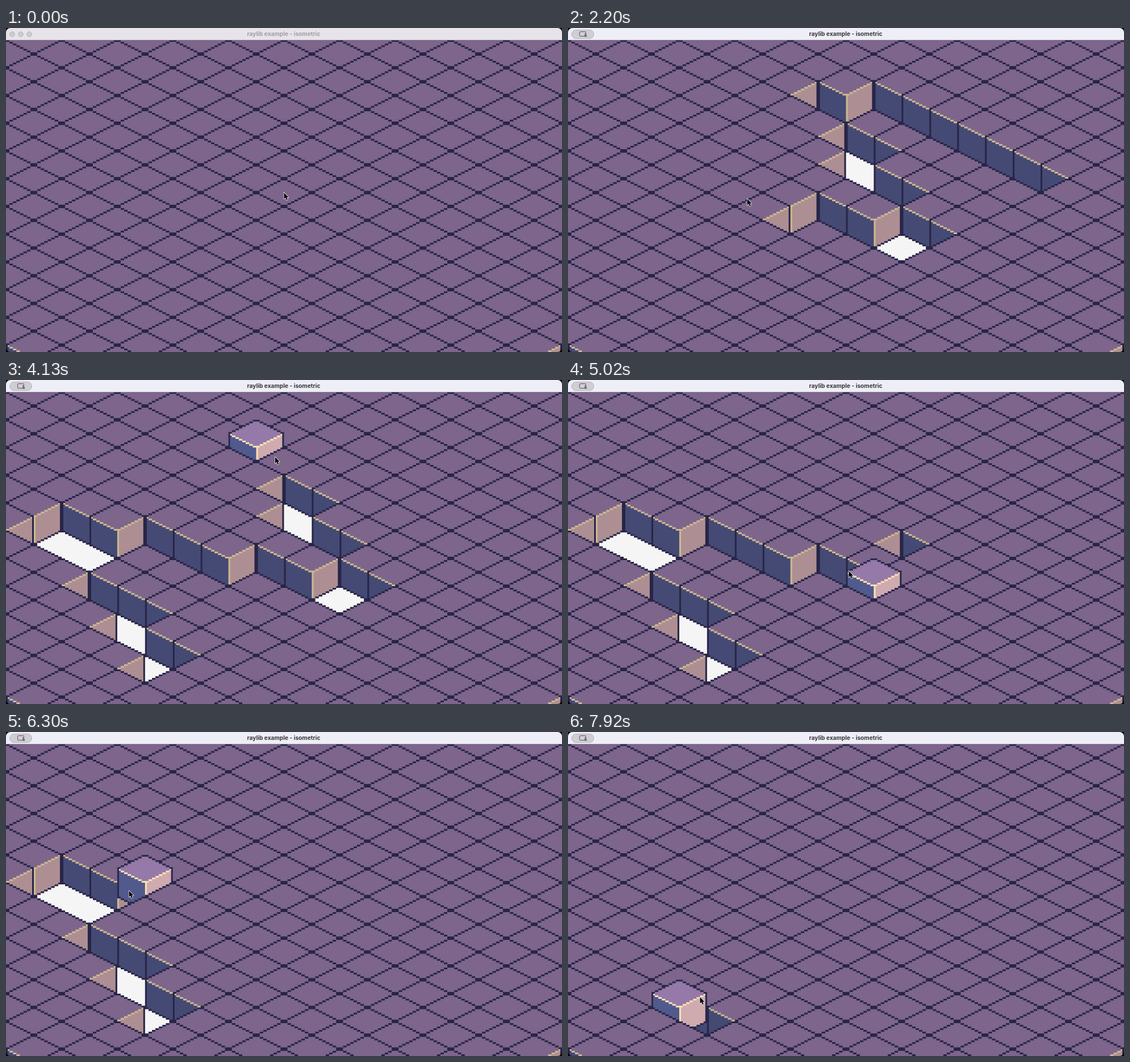
Write an HTML page with a canvas that moves like this. It is 979x572 px and loops after 8 s.

```html
<!DOCTYPE html>
<html lang="en">
<head>
<meta charset="utf-8">
<title>raylib example - isometric</title>
<style>
  html, body { margin: 0; width: 100%; height: 100%; overflow: hidden; background: #000; }
  canvas { display: block; }
</style>
</head>
<body>
<canvas id="stage" width="979" height="572"></canvas>
<script>
const LOOP = 8000, WIDTH = 979, HEIGHT = 572, BAR = 21.4;
const GAME_W = 320, GAME_H = 180, ZOOM = 4, LIFT = 8;
const SCALE = WIDTH / GAME_W;
const BUTTON_TIME = 420, FOCUS_TIME = 1060, POINTER_LEAD = 40;

// A tile is named by its top corner [i, j]: 16 pixels per i, 8 per j, i + j even.
// Each stroke runs at an even pace along the tiles between its corners.
const strokes = [
  { from: 180, to: 940, mode: 'look', corners: [[10,10], [16,10], [17,11]] },
  { from: 1060, to: 1715, mode: 'dig', corners: [[17,9], [11,3], [9,3], [10,4]] },
  { from: 1790, to: 2760, mode: 'dig', corners: [
    [10,6], [11,7], [10,8], [12,10], [12,12], [13,13], [12,14], [9,11], [8,12], [5,9],
    [4,10], [2,8], [1,9], [3,11], [3,13], [5,15], [4,16], [6,18], [5,19]] },
  { from: 2930, to: 3370, mode: 'look', corners: [[7,17], [10,14], [14,14], [18,10]] },
  { from: 3402, to: 4338, mode: 'fill', corners: [[17,9], [11,3], [10,4], [8,2], [10,4], [10,6], [11,7]] },
  { from: 4684, to: 5264, mode: 'fill', corners: [
    [10,8], [11,9], [13,9], [14,10], [14,12], [12,14], [12,12], [11,13], [10,12], [12,10], [10,10], [8,12]] },
  { from: 5495, to: 6295, mode: 'fill', corners: [[9,11], [8,12], [5,9]] },
  { from: 6375, to: 7105, mode: 'fill', corners: [[4,10], [2,8], [1,9], [3,11], [3,13], [4,14]] },
  { from: 7185, to: 7990, mode: 'fill', corners: [[3,13], [5,15], [4,16], [6,18], [4,18], [5,17]] }
];

// Moves diagonally to each corner, or by two along one axis when the other already fits.
function walk([start, ...corners]) {
  const tiles = [start];
  let [i, j] = start;
  for (const [toI, toJ] of corners) {
    while (i !== toI || j !== toJ) {
      const di = Math.sign(toI - i), dj = Math.sign(toJ - j);
      i += dj ? di : 2 * di;
      j += di ? dj : 2 * dj;
      tiles.push([i, j]);
    }
  }
  return tiles;
}

const visits = strokes.flatMap(({ from, to, mode, corners }) => walk(corners).map((tile, n, tiles) =>
  ({ time: from + (to - from) * n / (tiles.length - 1), mode, tile })));

const ctx = document.getElementById('stage').getContext('2d');
const game = makeCanvas(GAME_W * ZOOM, GAME_H * ZOOM);
const plainBlock = makeBlock({ line: '#282548', top: '#7d658c', left: '#444a74', right: '#ad8f93', edge: '#ccb88f' });
const litBlock = makeBlock({ line: '#2a294c', top: '#9579a8', left: '#515a8c', right: '#cfabb0', edge: '#fce0b2' });

function makeCanvas(width, height) {
  const canvas = document.createElement('canvas');
  canvas.width = width;
  canvas.height = height;
  return canvas;
}

function makeBlock(color) {
  const canvas = makeCanvas(32, 32), pen = canvas.getContext('2d');
  for (let x = 0; x < 32; x++) {
    const step = Math.min(x, 31 - x) >> 1;
    const top = 7 - step, rim = 8 + step, bottom = 24 + step;
    const column = (from, to, fill) => {
      pen.fillStyle = fill;
      pen.fillRect(x, from, 1, to - from);
    };
    column(top, bottom + 1, color.line);
    if (x === 0 || x === 31) continue;
    column(top + 1, rim, color.top);
    column(rim, rim + 1, color.edge);
    column(rim + 1, bottom, x < 16 ? color.left : x === 16 ? color.edge : color.right);
  }
  return canvas;
}

function worldAt(time) {
  const missing = new Set(['0,22', '20,22']);
  let hover = '';
  for (const visit of visits) {
    if (visit.time > time) break;
    hover = visit.tile.join();
    if (visit.mode === 'dig') missing.add(hover);
    if (visit.mode === 'fill') missing.delete(hover);
  }
  return { missing, hover };
}

function drawGame(time) {
  const pen = game.getContext('2d');
  const { missing, hover } = worldAt(time);
  pen.setTransform(ZOOM, 0, 0, ZOOM, 0, 0);
  pen.imageSmoothingEnabled = false;
  pen.fillStyle = '#f5f5f5';
  pen.fillRect(0, 0, GAME_W, GAME_H);
  for (let j = -2; j <= 22; j++) {
    for (let i = j & 1; i <= 20; i += 2) {
      const key = i + ',' + j;
      if (missing.has(key)) continue;
      const lit = key === hover;
      pen.drawImage(lit ? litBlock : plainBlock, 16 * i - 16, 8 * j - (lit ? LIFT : 0));
    }
  }
  ctx.imageSmoothingQuality = 'high';
  ctx.drawImage(game, 0, BAR, WIDTH, HEIGHT - BAR);
}

function shape(fill, stroke, build) {
  ctx.beginPath();
  build();
  if (fill) { ctx.fillStyle = fill; ctx.fill(); }
  if (stroke) { ctx.strokeStyle = stroke; ctx.stroke(); }
}

function drawShareButton() {
  shape('#d0ced4', '#b4b2b9', () => ctx.roundRect(6.5, 3.5, 39, 15, 7.5));
  shape(null, '#59575e', () => ctx.roundRect(20.5, 6.5, 11, 8, 1.5));
  shape('#d0ced4', null, () => ctx.rect(28, 9, 6, 7));
  shape('#59575e', null, () => ctx.arc(30.8, 10.8, 1.5, 0, 7));
  shape('#59575e', null, () => ctx.roundRect(28.3, 12.8, 5, 2.4, 1));
}

function drawTitleBar(time) {
  const focused = time >= FOCUS_TIME;
  ctx.lineWidth = 1;
  ctx.fillStyle = focused ? '#eeeef7' : '#e6e4e9';
  ctx.fillRect(0, 0, WIDTH, 21);
  ctx.fillStyle = '#8d8496';
  ctx.fillRect(0, 21, WIDTH, 0.8);
  if (time < BUTTON_TIME) {
    for (const x of [11, 26, 41]) shape('#cecccf', '#b3b1b5', () => ctx.arc(x, 11, 4.3, 0, 7));
  } else {
    drawShareButton();
  }
  ctx.font = 'bold 10.2px Inter, sans-serif';
  ctx.textAlign = 'center';
  ctx.fillStyle = focused ? '#39373c' : '#a09ea3';
  ctx.fillText('raylib example - isometric', 489, 14);
}

function tileCentre([i, j]) {
  return [16 * i * SCALE, BAR + 8 * (j + 1) * SCALE];
}

// The pointer glides from tile to tile, a little ahead of the game.
function pointerAt(time) {
  const last = visits.findLast(visit => visit.time <= time) || visits[0];
  const next = visits.find(visit => visit.time > time) || last;
  const part = next.time > last.time ? (time - last.time) / (next.time - last.time) : 0;
  const [x0, y0] = tileCentre(last.tile), [x1, y1] = tileCentre(next.tile);
  return [x0 + (x1 - x0) * part, y0 + (y1 - y0) * part];
}

function drawPointer(time) {
  ctx.save();
  ctx.translate(...pointerAt(time + POINTER_LEAD));
  ctx.lineWidth = 1.4;
  ctx.lineJoin = 'round';
  const arrow = new Path2D('M0 0V11.2L2.6 8.9L4.5 13.2L6.4 12.4L4.6 8.3H8Z');
  ctx.strokeStyle = '#fff';
  ctx.stroke(arrow);
  ctx.fillStyle = '#000';
  ctx.fill(arrow);
  ctx.restore();
}

function draw(now) {
  const time = now % LOOP;
  ctx.fillStyle = '#000';
  ctx.fillRect(0, 0, WIDTH, HEIGHT);
  ctx.save();
  ctx.beginPath();
  ctx.roundRect(0, 0, WIDTH, HEIGHT, 8);
  ctx.clip();
  drawGame(time);
  drawTitleBar(time);
  drawPointer(time);
  ctx.restore();
}

const begin = performance.now();
function tick() {
  draw(performance.now() - begin);
  requestAnimationFrame(tick);
}
tick();
</script>
</body>
</html>
```
